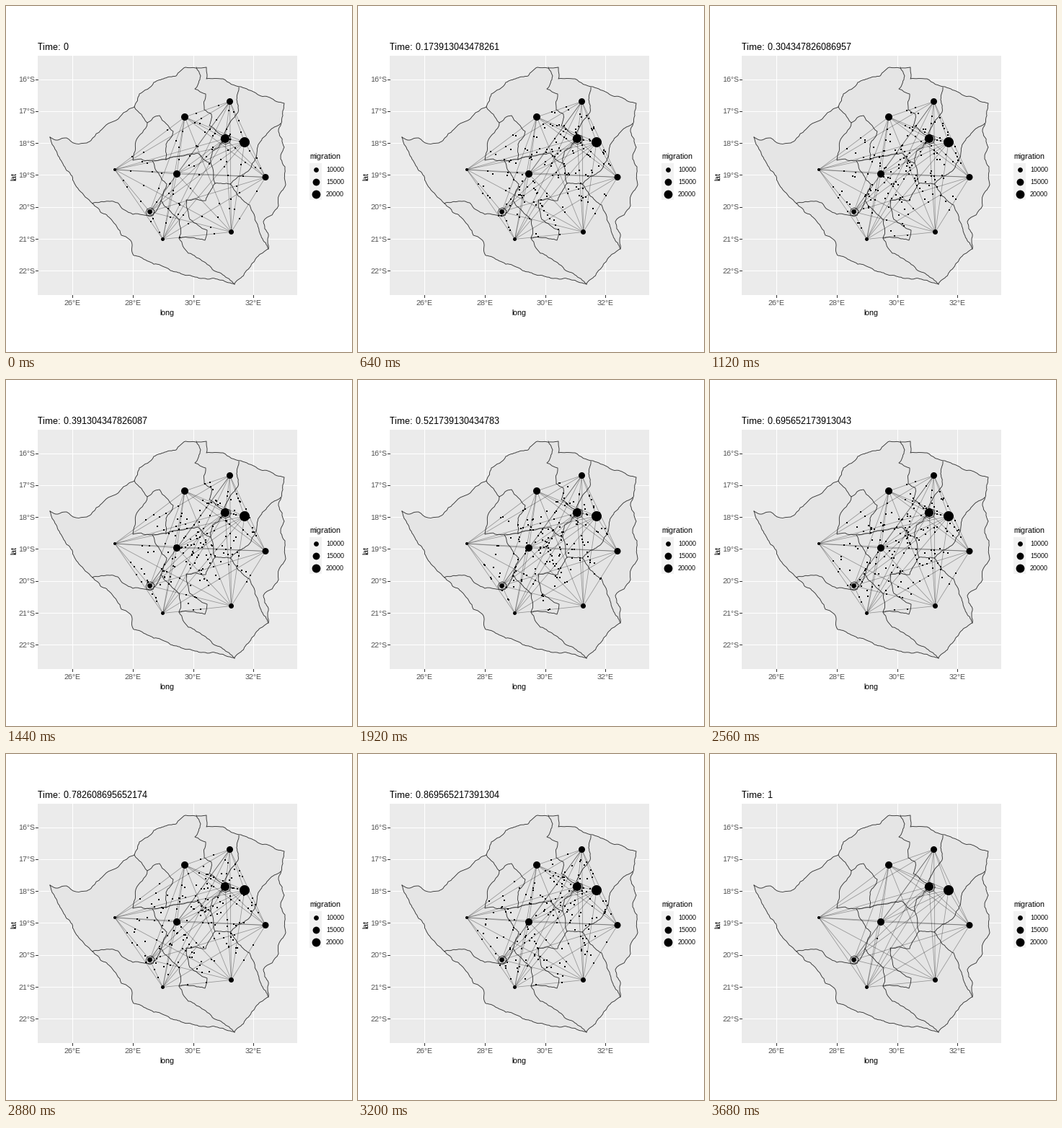
Write a matplotlib script that moves like this. It is 480 px wide and 480 px high and loops after 3.84 s.

```python
import itertools

import matplotlib.pyplot as plt
import numpy as np
from matplotlib.animation import FuncAnimation
from matplotlib.patches import Polygon, Rectangle

SIZE, DPI = 480, 100
PX = 72 / DPI  # points per pixel
FRAMES, INTERVAL = 24, 160
DARK, GREY = "#333333", "#4d4d4d"

plt.rcParams.update({
    "font.family": "Liberation Sans",
    "text.hinting": "native",
    "text.hinting_factor": 1,
})
rng = np.random.default_rng(4)

# Province centres (x, y, radius), in alphabetical order of province
NODES = np.array([
    (199.5, 285.5, 3.4), (304, 184, 6), (360, 237.5, 4.5),
    (310.5, 132.5, 4.5), (331, 189, 7), (248, 154, 5),
    (312.5, 313.5, 3.5), (151, 227, 2), (217.5, 323.5, 2.5),
    (237, 233, 5),
])

# Key points; fractal detail fills in the rest
NORTH = [(61, 182), (72, 186), (84, 183), (97, 191), (112, 190), (139, 165),
         (163, 148), (178, 140), (185, 122), (205, 106), (236, 97),
         (249, 85), (278, 85), (278, 101), (301, 101), (326, 112),
         (347, 121), (366, 127), (386, 135)]
EAST = [(384, 152), (378, 174), (386, 196), (381, 212), (387, 223),
        (388, 248), (379, 262), (378, 277), (357, 299), (364, 337),
        (317, 386)]
SOUTH = [(285, 378), (262, 376), (228, 367), (215, 360), (177, 346),
         (174, 327), (160, 318), (146, 296), (120, 274), (101, 255),
         (79, 219), (61, 182)]
BORDERS = [
    [(178, 140), (196, 162), (213, 152), (232, 174), (222, 192), (222, 213)],
    [(196, 162), (180, 188), (176, 214), (222, 213)],
    [(203, 215), (223, 247), (215, 270), (241, 297), (240, 322), (276, 325),
     (279, 311), (255, 296), (250, 269), (277, 270), (290, 246)],
    [(120, 274), (155, 273), (176, 289), (203, 290), (215, 270)],
    [(240, 322), (253, 343), (283, 361), (317, 386)],
    [(264, 85), (270, 97), (262, 115), (277, 122), (275, 144), (285, 150),
     (282, 166), (300, 179)],
    [(323, 113), (322, 147), (303, 177)],
    [(222, 213), (266, 204), (284, 218), (290, 246)],
    [(300, 189), (287, 201), (284, 218)],
    [(381, 163), (353, 188), (337, 228), (311, 247), (290, 246)],
    [(311, 247), (321, 262), (338, 276), (349, 303), (364, 337)],
]


def fractal(a, b, rough=0.1):
    """Points from a up to b, split by random midpoint displacement."""
    side = b - a
    if np.hypot(*side) < 4:
        return [a]
    normal = np.array([-side[1], side[0]])
    mid = (a + b) / 2 + normal * rng.uniform(-rough, rough)
    return fractal(a, mid, rough) + fractal(mid, b, rough)


def coast(points):
    points = np.array(points, float)
    parts = [fractal(a, b) for a, b in itertools.pairwise(points)]
    return np.array(sum(parts, []) + [points[-1]])


def ring(x, y, r):
    angle = np.linspace(0, 2 * np.pi, 9)
    return coast(np.column_stack([x + r * np.cos(angle),
                                  y + r * np.sin(angle)]))


def stroke(xs, ys, color, width=1, **kw):
    ax.plot(xs, ys, color=color, lw=width * PX, **kw)


def label(x, y, text, size, color="black", **kw):
    return ax.text(x, y, text, fontsize=size * PX, color=color,
                   **{"va": "baseline", **kw})


def discs(x, y, r):
    ax.scatter(x, y, s=(2 * np.asarray(r) * PX) ** 2, color="black",
               linewidths=0, zorder=5)


fig = plt.figure(figsize=(SIZE / DPI, SIZE / DPI), dpi=DPI, facecolor="white")
ax = fig.add_axes([0, 0, 1, 1])
ax.set(xlim=(0, SIZE), ylim=(SIZE, 0))
ax.axis("off")

# Panel, grid and axes
ax.add_patch(Rectangle((44, 69), 360, 332, fc="#ebebeb", lw=0))
for i in range(4):
    x = 92.1 + 83.7 * i
    stroke([x, x], [69, 401], "white", zorder=1)
    stroke([x, x], [401, 404], DARK)
    label(x, 415, f"{26 + 2 * i}°E", 10, GREY, ha="center")
for i in range(7):
    y = 101.6 + 44.3 * i
    stroke([44, 404], [y, y], "white", zorder=1)
    stroke([41, 44], [y, y], DARK)
    label(40, round(y + 3.5), f"{16 + i}°S", 10, GREY, ha="right")
label(223.5, 429, "long", 11, ha="center")
label(16, 236, "lat", 11, rotation=90, ha="right", va="center")

# Map
outline = coast(NORTH + EAST + SOUTH)
ax.add_patch(Polygon(outline, fc="#e5e5e5", lw=0, zorder=2))
lines = [outline, *map(coast, BORDERS), ring(200, 286, 6), ring(305, 185, 7)]
for line in lines:
    stroke(*line.T, DARK, 0.9, zorder=3)

# Links and centres
for a, b in itertools.combinations(NODES[:, :2], 2):
    stroke([a[0], b[0]], [a[1], b[1]], "black", 0.8, alpha=0.35, zorder=4)
discs(*NODES.T)

# Legend
label(421, 212, "migration", 11)
for i, (value, r) in enumerate([(10000, 3.4), (15000, 4.9), (20000, 5.9)]):
    y = 218 + 17 * i
    ax.add_patch(Rectangle((421, y), 17, 17, fc="#f2f2f2", lw=0))
    discs(429.5, y + 8.5, r)
    label(444, y + 12, str(value), 9)

# Each trip runs over the middle half of its link
trips = [(o, d) for d in range(10) for o in range(10) if o != d]
origin, target = (NODES[list(ends), :2] for ends in zip(*trips))
first = origin + 0.25 * (target - origin)
last = origin + 0.75 * (target - origin)
# Besides its own end, each trip also drifts to the end of the one before
begin = np.vstack([first, first[1:]])
finish = np.vstack([last, last[:-1]])

dots, = ax.plot([], [], "s", ms=2 * PX, mew=0, color="black", zorder=6)
title = label(44, 61, "", 13)


def update(frame):
    t = frame / (FRAMES - 1)
    places = last[-1:] if t == 1 else begin + (finish - begin) * t
    dots.set_data(*places.T)
    title.set_text(f"Time: {t:.15g}")
    return dots, title


anim = FuncAnimation(fig, update, frames=FRAMES, interval=INTERVAL,
                     repeat=True, repeat_delay=0)
plt.show()
```
